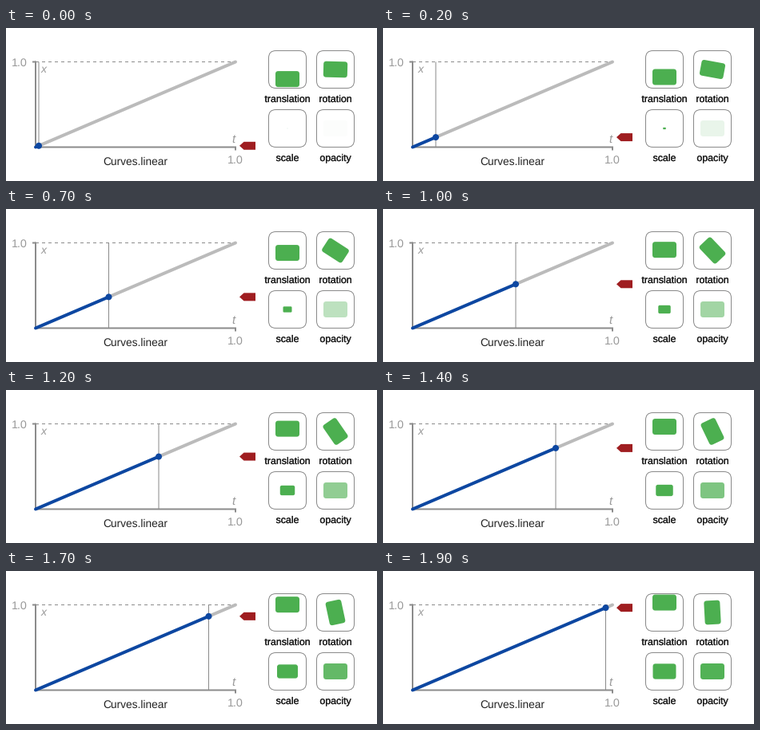
A matplotlib script that plays this animation: 464 by 192 pixels, repeating every 2000 ms.

```python
import matplotlib.pyplot as plt
from matplotlib.animation import FuncAnimation
from matplotlib.patches import Circle, FancyBboxPatch, Polygon
from matplotlib.patheffects import withStroke
from matplotlib.transforms import Affine2D

W, H, DPI = 464, 192, 64
PX = 72 / DPI  # points per pixel
FRAMES, INTERVAL = 20, 100

BLUE, GREEN, RED = "#0d47a1", "#4caf50", "#9f1d20"
AXIS, PALE, EDGE = "#8c8c8c", "#bbbbbb", "#8a8a8a"
X0, X1, Y0, Y1 = 37, 287, 149.5, 42.5

plt.rcParams["font.family"] = "Liberation Sans"
plt.rcParams["text.hinting"] = "no_hinting"

fig = plt.figure(figsize=(W / DPI, H / DPI), dpi=DPI, facecolor="white")
ax = fig.add_axes([0, 0, 1, 1])
ax.set_xlim(0, W)
ax.set_ylim(H, 0)
ax.axis("off")


def line(xs, ys, color, width, z, cap="butt", **kw):
    return ax.plot(xs, ys, color=color, lw=width * PX, zorder=z, snap=False,
                   solid_capstyle=cap, dash_capstyle=cap, **kw)[0]


def label(x, y, text, size, color, ha="center", weight=0, **kw):
    t = ax.text(x, y, text, fontsize=size * PX, color=color, ha=ha,
                va="baseline", zorder=5, **kw)
    if weight:
        t.set_path_effects([withStroke(linewidth=weight * PX, foreground=color)])


def rounded(x, y, w, h, r, **kw):
    box = FancyBboxPatch((x, y), w, h, mutation_aspect=1, snap=False,
                         boxstyle=f"round,pad=0,rounding_size={r}", **kw)
    return ax.add_patch(box)


# Graph
line([X0, X1], [Y1, Y1], AXIS, 1, 1, dashes=(4, 4))
line([X0, X0], [Y1 - 1, Y0 + 1], AXIS, 2, 2)
line([X0 - 1, X1 + 1], [Y0, Y0], AXIS, 2, 2)
line([X0 - 4, X0], [Y1, Y1], AXIS, 2, 2)
line([X1, X1], [Y0, Y0 + 4], AXIS, 2, 2)
rest = line([], [], PALE, 4, 3, cap="round")
trace = line([], [], BLUE, 4, 4, cap="round")
marker = line([], [], EDGE, 1, 3.5)
dot = ax.add_patch(Circle((X0, Y0), 4, fc=BLUE, lw=0, zorder=5))
arrow = ax.add_patch(Polygon([(0, 0)], fc=RED, lw=0, zorder=5, snap=False))

label(17, 48, "1.0", 14.3, "#999999")
label(287, 170, "1.0", 14.3, "#999999")
label(44, 56, "x", 14, "#999999", ha="left", style="italic")
label(284.3, 144, "t", 15, "#999999", style="italic")
label(162, 172, "Curves.linear", 13.8, "#222222")

# Sample tiles
tiles = {"translation": (352, 52), "rotation": (412, 52),
         "scale": (352, 126), "opacity": (412, 126)}
blocks = {}
for name, (cx, cy) in tiles.items():
    rounded(cx - 23.5, cy - 23.5, 47, 47, 9, fc="white", ec=EDGE, lw=PX, zorder=1)
    label(cx, cy + 41, name, 12.4, "#1a1a1a", weight=0.2)
    blocks[name] = rounded(-15, -10, 30, 20, 3.5, fc=GREEN, lw=0, zorder=2)


def place(name, dy=0, angle=0, scale=1):
    cx, cy = tiles[name]
    move = Affine2D().scale(scale).rotate_deg(angle).translate(cx, cy + dy)
    blocks[name].set_transform(move + ax.transData)


def update(i):
    t = 0.016 + i / FRAMES
    x, y = X0 + (X1 - X0) * t, Y0 + (Y1 - Y0) * t
    trace.set_data([X0, x], [Y0, y])
    rest.set_data([x, X1], [y, Y1])
    marker.set_data([x, x], [Y1, Y0])
    dot.center = x, y
    arrow.set_xy([(292, y), (297.5, y - 5), (312, y - 5),
                  (312, y + 5), (297.5, y + 5)])
    place("translation", dy=12.5 - 25.8 * t)
    place("rotation", angle=90 * t)
    place("scale", scale=t)
    place("opacity")
    blocks["opacity"].set_alpha(t)
    return rest, trace, marker, dot, arrow, *blocks.values()


anim = FuncAnimation(fig, update, frames=FRAMES, interval=INTERVAL,
                     init_func=lambda: update(0), repeat=True,
                     repeat_delay=0, blit=False)
plt.show()
```
